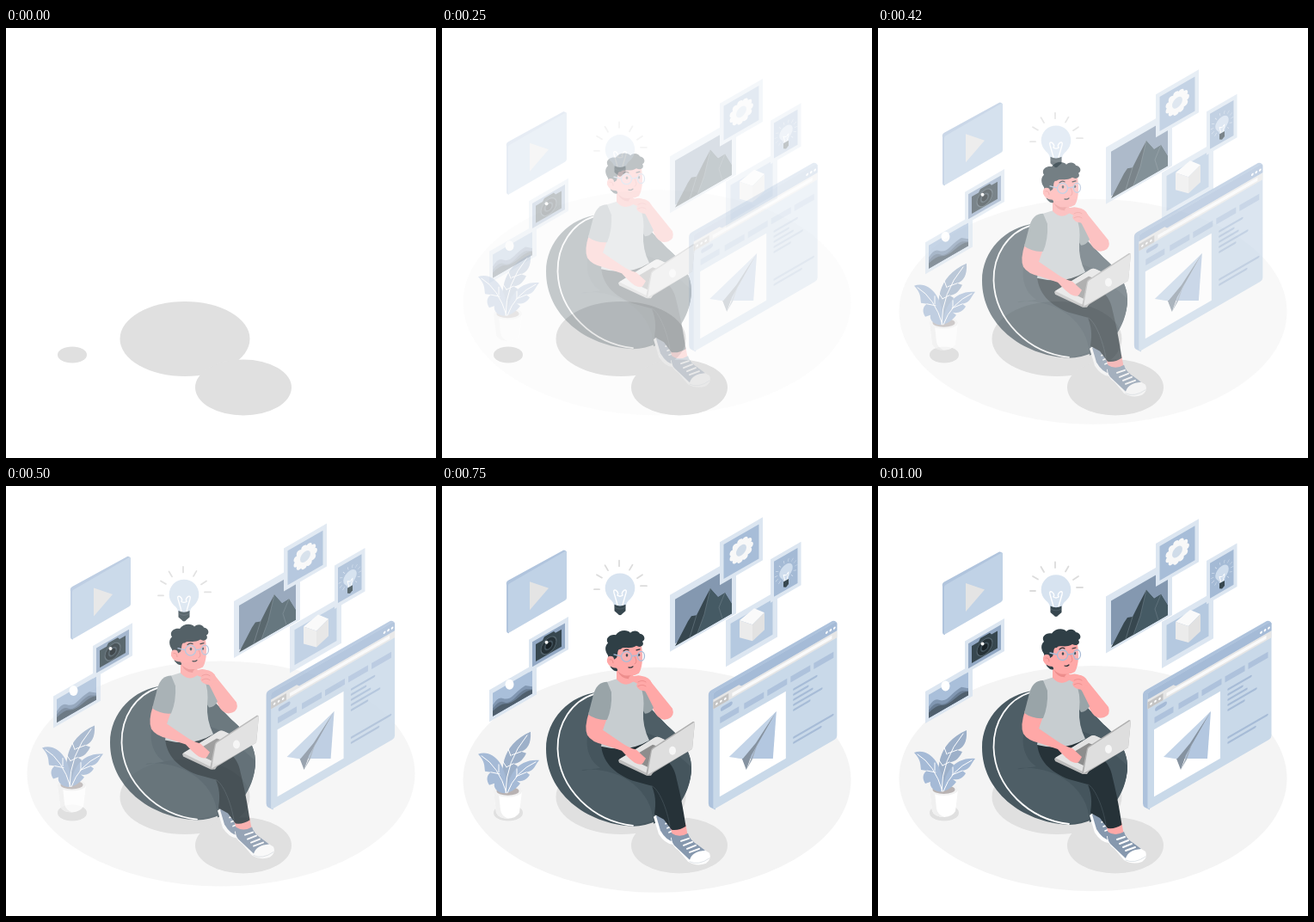
An HTML page that plays this animation: 500 px wide and 500 px high, repeating every 1.04 s.

```html
<!DOCTYPE html>
<html lang="en">
<head>
<meta charset="utf-8">
<title>Thinking at a laptop</title>
<style>
html, body { margin: 0; width: 100%; height: 100%; overflow: hidden; background: #fff }
svg { display: block; width: 100%; height: 100% }
.line { fill: none; stroke-linecap: round; stroke-linejoin: round }
.frame { fill: #dce6f1 }
.skin { fill: #ffa8a7 }
.dark { fill: #263238 }
.hair { fill: #2f3f46 }
.mid { fill: #37474f }
.shoe { fill: #8698ae }
.shade { fill: #e0e0e0 }
.block { fill: #aec2dc }
</style>
</head>
<body>
<!-- data-from: where a part starts, relative to its resting place -->
<svg viewBox="0 0 500 500">
  <g data-from="0 -30"><ellipse cx="250" cy="340" rx="225.5" ry="131" fill="#f4f4f4"/></g>

  <g class="shade">
    <ellipse cx="208" cy="361.5" rx="75.5" ry="43.5"/>
    <ellipse cx="276" cy="418" rx="56" ry="32.5"/>
    <ellipse cx="77" cy="380" rx="17" ry="9.5"/>
  </g>

  <!-- pictures on the left -->
  <g data-from="0 30">
    <path fill="#b0c4dd" d="M75 117Q74 113 77 111.500L141 76.500Q144 76 145 79L78 120V173Q75 173 75 170Z"/>
    <g transform="translate(77 116)skewY(-30)">
      <rect width="68" height="57" rx="2" fill="#c0d2e6"/>
    </g>
    <path fill="#e4e4e4" d="M102 113L124 120.500L102 146Z"/>

    <g transform="translate(55 239)skewY(-30)">
      <rect class="frame" width="55" height="37"/>
      <rect x="4" y="6" width="46" height="27" fill="#a9bfda"/>
      <path fill="#8197b2" d="M4 20Q10 13 16 19T29 22T42 19L50 25V33H4Z"/>
      <path fill="#697d94" d="M4 24Q11 18 17 24T31 26T43 24L50 28V33H4Z"/>
      <path fill="#4f5f6d" d="M4 27Q13 23 19 27T35 28T50 29V33H4Z"/>
    </g>
    <ellipse cx="78.500" cy="232.500" rx="5" ry="6" fill="#fff"/>

    <g transform="translate(101 180.500)skewY(-30)">
      <rect class="frame" width="46" height="38"/>
      <rect x="4" y="5" width="38" height="29" fill="#93a9c5"/>
      <path class="mid" d="M8 10H16L18 7H29L31 10H38V30H8Z"/>
      <circle cx="23" cy="20" r="9.500" fill="#55656f"/>
      <circle cx="23" cy="20" r="8.500" class="dark"/>
      <circle cx="23" cy="20" r="5" fill="#43535d"/>
      <circle cx="23" cy="20" r="3.500" fill="#182126"/>
    </g>
    <circle cx="121.500" cy="183.500" r="2" fill="#f5f5f5"/>
  </g>

  <!-- pictures on the right -->
  <g data-from="0 30">
    <g transform="translate(265 128.500)skewY(-30)">
      <rect class="frame" width="77" height="66"/>
      <rect x="6" y="8.500" width="66" height="51.500" fill="#8498b0"/>
    </g>
    <path class="mid" d="M271 188L286 159L290 153L296 152L304 136L312 121L321 131L329 126L337 139V150Z"/>
    <path fill="#455a64" d="M312 121L321 131L329 126L337 139V150L297 173L305 151Z"/>
    <path class="line" stroke="#70808a" stroke-width=".6" d="M312 121L305 151L297 173M296 152L288 178M329 126L322 143L326 156"/>

    <g transform="translate(330 158)skewY(-30)">
      <rect class="frame" width="60" height="54"/>
      <rect x="5.500" y="7" width="49" height="41" fill="#b5c9e0"/>
    </g>
    <path fill="#fafafa" d="M346 158L363 144L375 149L361 163Z"/>
    <path fill="#ebebeb" d="M346 158L361 163V182L346 178Z"/>
    <path fill="#e2e2e2" d="M361 163L375 149V169L361 182Z"/>

    <g transform="translate(382 87)skewY(-30)">
      <rect class="frame" width="35.500" height="50.500"/>
      <rect x="4" y="5" width="27.500" height="41" fill="#a4bad5"/>
      <circle class="line" cx="18" cy="24" r="11.500" stroke="#dce6f2" stroke-width="3.500" pathLength="14" stroke-dasharray=".1 .9" style="stroke-linecap:butt"/>
      <path fill="#cfdded" d="M15 35Q15 32 12 29A7.800 7.800 0 1 1 24 29Q21 32 21 35Z"/>
      <path class="line" stroke="#fff" stroke-width=".8" d="M17 35L15 27L18 29L21 27L19 35"/>
      <path class="mid" d="M15 35H21V41L18 43L15 41Z"/>
    </g>

    <g transform="translate(323 67)skewY(-30)">
      <rect class="frame" width="50" height="50"/>
      <rect x="4.500" y="5.500" width="41" height="40" fill="#a7bdd8"/>
      <circle class="line" cx="25" cy="24" r="10.500" stroke="#f8f8f8" stroke-width="6.800" pathLength="11" stroke-dasharray="0 1"/>
      <circle cx="25" cy="24" r="9" fill="#f8f8f8"/>
      <circle cx="25" cy="24" r="6" fill="#d0dce9"/>
    </g>
  </g>

  <!-- browser window -->
  <g data-from="-30 0">
    <path fill="#adc2dc" d="M308 243Q308 239 312 237L452 157Q456 156 457.500 160L316 244V376.500L310 373.500Q308 372 308 369Z"/>
    <g transform="translate(313.500 240.500)skewY(-30)">
      <rect width="144" height="136" rx="3" fill="#c9d9e9"/>
      <path fill="#a5bbd7" d="M0 11V3Q0 0 3 0H141Q144 0 144 3V11Z"/>
      <g fill="#fff"><circle cx="132" cy="6" r="1.400"/><circle cx="136.500" cy="6" r="1.400"/><circle cx="141" cy="6" r="1.400"/></g>
      <path fill="#e6e6e6" d="M0 11V8H30L33 11H144V19H0Z"/>
      <path fill="#c4c4c4" d="M0 11H18V19H0Z"/>
      <path fill="#fafafa" d="M22 13H138V17H22Z"/>
      <g fill="#fff"><circle cx="4" cy="15" r="1.300"/><circle cx="9" cy="15" r="1.300"/><circle cx="14" cy="15" r="1.300"/></g>
      <path class="line" stroke="#a5bad6" stroke-width="5" d="M11 24.500H20"/>
      <g class="block">
        <rect x="8" y="33" width="22" height="7"/><rect x="36" y="33" width="23" height="7"/>
        <rect x="63" y="33" width="23" height="7"/><rect x="90" y="33" width="23" height="7"/>
        <rect x="117" y="33" width="23" height="7"/>
      </g>
      <rect x="7.500" y="47" width="77" height="78" fill="#fff"/>
      <path class="line" stroke="#a7bcd7" stroke-width="2.500" d="M94 50H120M94 56H110M94 62H115M94 68H126M94 74H112M94 106H139M94 112H125"/>
    </g>
    <path fill="#c3d4e8" d="M387 262L332 315L352 318Z"/>
    <path fill="#b3c7e0" d="M387 262L355 317L383 317Z"/>
    <path fill="#8592a0" d="M387 262L347 317L352 330L358 313Z"/>
    <path fill="#c3d4e8" d="M387 262L340 316L348 317L363 299Z"/>
    <path fill="#a0acb9" d="M366 297L352 330L359 318Z"/>
  </g>

  <!-- man on the bean bag -->
  <g data-from="0 -30">
    <path fill="#485860" d="M182 238C149 241 121 269 121 304C121 354 166 391 222 394C262 393 290 360 290 325C290 309 279 291 262 277L236 250Z"/>
    <path fill="#4e5e66" d="M182 239C151 248 134 274 134.500 304C136 351 176 388 222 393C260 389 290 360 290 325C290 309 279 291 262 277L236 250Z"/>
    <path fill="#45555d" d="M181 264C160 290 169 317 184 326Q155 331 165 328C205 325 245 350 246 391C274 380 290 353 290 325L250 290Z"/>
    <path class="line" stroke="#fff" stroke-width="1.800" d="M177 240C151 248 134 274 134.500 304C136 351 176 388 222 393"/>

    <!-- rear shoe -->
    <path fill="#fff" d="M246 383L250 380L269 406L268 415Q259 414 252 403Z"/>
    <path class="shoe" d="M249 382L259 377L271 394L270 412Q261 411 254 399Z"/>
    <path class="line" stroke="#fff" stroke-width="1.600" d="M260 391L264 389M262 396L267 394M264 401L269 399"/>

    <!-- legs -->
    <path class="skin" d="M265 394L283 390L286 406L270 411Z"/>
    <path class="dark" d="M185 296C185 319 201 333 222 341L244 347C250 362 248 372 247 380L258 386L267 398Q276 399 283.500 394C281 376 277 356 273 340C271 328 266 317 250 311L237 295Z"/>
    <path class="line" stroke="#435159" stroke-width=".8" d="M244 347C252 350 262 374 265 394"/>

    <!-- front shoe -->
    <path fill="#fff" d="M266 407Q266 416 275 422L286 435Q296 441 307 437Q314 432 311 425L288 411Z"/>
    <path class="shoe" d="M267 402Q276 408 286 402Q288 410 298 416L306 422Q291 423 288 433L270 416Q266 411 267 402Z"/>
    <path class="line" stroke="#fff" stroke-width="2" d="M278 411L287 408M281 416L291 412M285 420L295 416M288 424L299 420"/>
    <path class="line" stroke="#d2d8df" stroke-width=".7" d="M288 435Q298 440 311 431"/>

    <!-- far arm -->
    <path class="skin" d="M222 220Q228 217 235 220L243 226L268 257Q271 266 263 269Q255 272 249 264L241 250L229 235Q221 232 222 220Z"/>
    <path fill="#99a4a8" d="M229 229Q236 235 239 242L246 256Q242 263 236 263L231 255Z"/>

    <!-- body -->
    <path fill="#c7cdd0" d="M192 226L205 222Q213 229 222 225L230 230Q236 241 234 260Q233 278 241 294Q217 309 185 301Q188 282 187 265L184 244Z"/>
    <path class="skin" d="M203 203V223Q212 233 222 226V212Z"/>
    <path fill="#ed8d8c" d="M204 213Q212 222 222 217L220 222Q209 224 204 213Z"/>

    <!-- head -->
    <path class="hair" d="M192 191L196 209Q201 215 204 213L206 188Z"/>
    <path class="skin" d="M201 185L231 179C234 193 234 208 229 216Q223 220 215 218Q206 217 203 210Q195 210 192 203Q191 196 197 195L202 197Z"/>
    <path class="hair" d="M194 196C189 191 189 184 193 181C189 175 196 170 202 171.500C206 165 216 165 219 169C223 165 229 167 230 170C236 171 237 177 233 179C236 183 231 187 226 184C218 189 211 184 208 188C203 187 205 194 203 198L200 200Q200 195 194 196Z"/>
    <path class="line" stroke="#e68987" stroke-width=".9" d="M195 200Q199 199 199 204M224 196Q228 204 224 205"/>
    <path class="line" stroke="#263238" stroke-width="1.200" d="M211 190Q214 187 217 189M226 189L230 188M217 209Q220 210 222 208"/>
    <ellipse class="dark" cx="215" cy="195" rx="1.300" ry="1.800"/>
    <ellipse class="dark" cx="229" cy="194.500" rx="1.200" ry="1.700"/>
    <path class="line" stroke="#a9bdd8" stroke-width="1.300" d="M200 194L208 196M221 196L227 195"/>
    <g fill="#dce7f4" fill-opacity=".15" stroke="#a9bdd8" stroke-width="1.300">
      <ellipse cx="214.500" cy="196.500" rx="6" ry="6"/><ellipse cx="231.500" cy="196" rx="4" ry="5.500"/>
    </g>

    <!-- hand on the chin -->
    <path class="skin" d="M217 222Q219 216 225 220L236 220Q244 223 244 230L238 237Q227 236 226 230L229 226Q223 228 217 222Z"/>
    <path class="line" stroke="#ed8d8c" stroke-width=".9" d="M228 226Q233 223 237 226M228 231Q233 228 237 231"/>

    <!-- laptop -->
    <path fill="#bdbdbd" d="M205 317L247 291Q250 289 254 291L269 298L243 335H238L206 320Z"/>
    <path fill="#e3e3e3" d="M206 316L247 291Q250 289 254 291L269 298L240 333Z"/>
    <path fill="#8d8d8d" d="M218 315L245 299L256 303L239 325Z"/>

    <!-- near arm -->
    <path class="skin" d="M171 261Q165 279 169 288Q174 296 188 299L209 306Q217 315 224 320Q232 324 234 320L237 315L226 305Q216 302 209 297L187 282L193 265Z"/>
    <path fill="#99a4a8" d="M192 226Q180 226 176 241L170 264Q180 271 192 270Q198 256 197 238Z"/>

    <path fill="#b0b0b0" d="M237 334L243 305Q244 303 246 302L292 272L294 273L291 304L240 335Z"/>
    <path fill="#dedede" d="M239 334L244 306Q245 304 247 303L294 272.500L291 304Z"/>
    <ellipse cx="268" cy="306" rx="4" ry="5" fill="#f7f7f7"/>
  </g>

  <!-- plant -->
  <g data-from="0 -30">
    <path fill="#fff" d="M60 353L63 378Q66 385 77 385Q87 384 90 378L93 353Z"/>
    <path fill="#f0f0f0" d="M60 353L63 378Q66 385 77 385Q69 382 68 375L66 356Z"/>
    <ellipse cx="76.500" cy="353" rx="16.500" ry="7" fill="#f2f2f2"/>
    <ellipse cx="76.500" cy="353" rx="13" ry="5" fill="#b8b2b2"/>
    <path fill="#9db0c9" d="M75 355C66 332 68 299 103 284C104 298 99 305 92 307L98 309C93 319 88 321 83 321L88 324C84 336 78 343 75 355Z"/>
    <g fill="#a5bad6">
      <path d="M42 310C58 304 76 320 76 355C68 357 59 351 61 344L55 346C51 340 52 334 57 331L50 330C49 322 50 319 42 310Z"/>
      <path d="M76 355C76 335 88 315 113 317C108 323 107 330 98 331L102 334C98 341 92 342 87 341L91 344C86 351 80 354 76 355Z"/>
    </g>
    <path class="line" stroke="#fff" stroke-width="1" d="M74 355Q74 318 99 288M75 355Q66 324 46 312M76 355Q85 330 109 319M75 325L71 319M75 325L83 321M80 312L77 304M81 311L92 307M67 333L57 331M66 331L66 322M87 335L87 327M86 336L98 331"/>
  </g>

  <!-- idea bulb -->
  <g data-from="0 30">
    <path class="line" stroke="#dcdcdc" stroke-width="1.800" d="M177 122H183M180 105L186 108.500M189.500 94L193 100M206 88.500V95M221.500 93.500L218 99.500M233 105L227 109M231 118H238"/>
    <path fill="#d7e3f0" d="M200 141Q200 137 195 133A17.300 17.300 0 1 1 219 133Q214 137 214 141Q207 144 200 141Z"/>
    <path class="line" stroke="#fff" stroke-width="1.400" d="M204 140L200 126Q199 122 202 123Q206 126 204 129Q207 131 210 129Q208 126 212 123Q215 122 214 126L210 140"/>
    <path class="mid" d="M200.500 139.500Q207 143 213.500 139.500V147L210 150Q207 154 204 150L200.500 147Z"/>
    <path class="line" stroke="#55656f" stroke-width=".7" d="M201 143Q207 147 213 143"/>
  </g>
</svg>
<script>
const LOOP = 1040, RATE = 24;
const parts = [...document.querySelectorAll('[data-from]')].map(el => ({
  el, from: el.dataset.from.split(' ').map(Number)
}));

const cubic = (a, b, s) => 3 * (1 - s) ** 2 * s * a + 3 * (1 - s) * s * s * b + s ** 3;

// cubic-bezier(.36, -.01, .5, 1.38): lands after a small overshoot
function ease(x) {
  let lo = 0, hi = 1;
  for (let i = 0; i < 24; i++) {
    const s = (lo + hi) / 2;
    if (cubic(.36, .5, s) < x) lo = s; else hi = s;
  }
  return cubic(-.01, 1.38, hi);
}

function draw(now) {
  const step = Math.floor((now % LOOP + 4) * RATE / 1000);
  const p = step < 2 ? 0 : ease(Math.min(1, (step + 1) / RATE));
  for (const { el, from: [x, y] } of parts) {
    el.setAttribute('transform', `translate(${x * (1 - p)} ${y * (1 - p)})`);
    el.setAttribute('opacity', Math.min(1, Math.max(0, p)));
  }
}

const start = performance.now();
function tick() {
  draw(performance.now() - start);
  requestAnimationFrame(tick);
}
tick();
</script>
</body>
</html>
```
